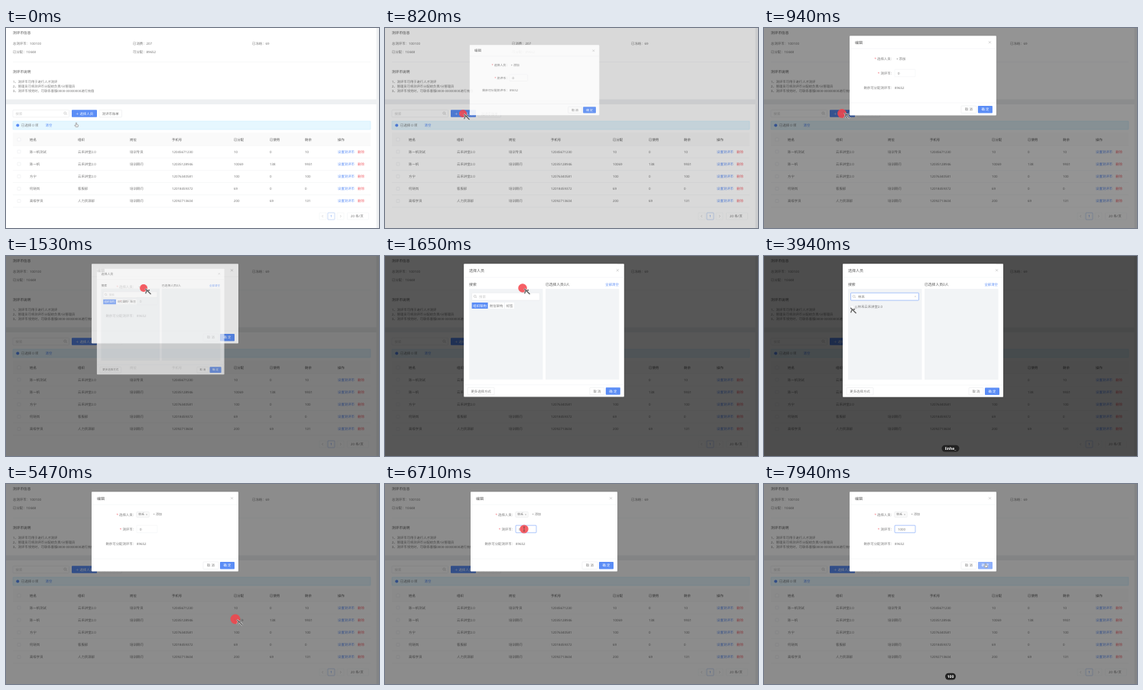
An HTML page for the animation above (8 s loop, 488x262 px).

```html
<!DOCTYPE html>
<html lang="zh-CN">
<head>
<meta charset="utf-8">
<title>测评币分配</title>
<style>
html, body { margin: 0; width: 100%; height: 100%; overflow: hidden; background: #fff; }
svg { display: block; width: 488px; height: 262px; }
text { font-family: "Noto Sans", "Noto Sans CJK SC", "Noto Sans CJK", sans-serif; white-space: pre; text-rendering: geometricPrecision; }
</style>
</head>
<body>
<svg id="stage" viewBox="0 0 488 262"></svg>
<script>
const BLUE = '#5b8df6', RED = '#f2626a', LINE = '#eef0f2', EDGE = '#e4e6e9';
const INK = '#777', DARK = '#555', PALE = '#c8c8c8';
const ORG = '云禾讲堂2.0', PERSON = '林禾', PINYIN = 'linhe_';
const MASK = 0.45;

// ---- Markup helpers: y of a text is its vertical middle ----
const text = (x, y, s, { fill = INK, size = 4.4, weight = 400, anchor = 'start', id = '' } = {}) =>
  `<text ${id && `id="${id}"`} x="${x}" y="${y + size * 0.36}" font-size="${size}" font-weight="${weight}" fill="${fill}" text-anchor="${anchor}">${s}</text>`;
const box = (x, y, w, h, fill = '#fff', stroke = 'none', r = 0, extra = '') =>
  `<rect x="${x}" y="${y}" width="${w}" height="${h}" rx="${r}" fill="${fill}" stroke="${stroke}" stroke-width=".5" ${extra}/>`;
const path = (d, stroke = PALE, width = 0.6, fill = 'none') =>
  `<path d="${d}" fill="${fill}" stroke="${stroke}" stroke-width="${width}"/>`;
const rule = (x, y, w, color = LINE) => path(`M${x} ${y}h${w}`, color, 0.5);
const group = (id, body) => `<g id="${id}">${body}</g>`;
const check = (x, y) => box(x - 2, y - 2, 4, 4, '#fff', EDGE, 0.5);
const lens = (x, y) => path(`M${x + 1} ${y + 1}l1.2 1.2M${x + 1.3} ${y}a1.5 1.5 0 1 0 -3 0a1.5 1.5 0 1 0 3 0`, '#aaa', 0.5);
const cross = (x, y, r = 1.5) => path(`M${x - r} ${y - r}l${2 * r} ${2 * r}m0 ${-2 * r}l${-2 * r} ${2 * r}`, '#aaa', 0.5);
const button = (x, y, w, h, label, primary, id = '') =>
  box(x, y, w, h, primary ? BLUE : '#fff', primary ? 'none' : EDGE, 0.8, id && `id="${id}"`) +
  text(x + w / 2, y + h / 2, label, { fill: primary ? '#fff' : INK, anchor: 'middle' });

function pageMarkup() {
  const columns = [31, 94, 162, 217, 298, 345, 391];
  const heads = ['姓名', '组织', '岗位', '手机号', '已分配', '已使用', '剩余'];
  const rows = [
    ['陈一帆测试', ORG, '培训专员', '12045671230', '10', '0', '10'],
    ['陈一帆', ORG, '培训顾问', '12035128946', '10069', '138', '9931'],
    ['方宁', ORG, '', '12076340581', '100', '0', '100'],
    ['何晓岚', '客服部', '培训顾问', '12018459372', '69', '0', '0'],
    ['高级学员', '人力资源部', '培训顾问', '12092713604', '200', '69', '131'],
  ];
  const table = rows.map((row, i) => {
    const y = 162 + i * 16.15;
    return check(17, y) + row.map((s, c) => text(columns[c], y, s)).join('') +
      text(434, y, '设置测评币', { fill: BLUE }) + text(460, y, '删除', { fill: RED }) + rule(9, y + 8.2, 468);
  }).join('');
  return box(0, 0, 488, 262, '#eef0f2') + box(0, 0, 484.5, 93.5) + box(0, 100, 484.5, 162) +
    text(9, 6.5, '测评币信息', { size: 4.7, weight: 500, fill: DARK }) +
    text(9, 20, '总测评币：100100') + text(166, 20, '已消费：207') + text(322, 20, '已冻结：69') +
    text(9, 31, '已分配：10448') + text(166, 31, '可分配：89652') + rule(9, 44.5, 468) +
    text(9, 57.5, '测评币说明', { size: 4.7, weight: 500, fill: DARK }) +
    ['1、测评币可用于进行人才测评', '2、管理员可将测评币分配给负责/分管理员', '3、测评币领完时，可联系客服0000-00000000进行充值']
      .map((s, i) => text(9, 70 + i * 6.4, s, { size: 4.3 })).join('') +
    box(9, 107.3, 73.5, 9.5, '#fff', EDGE, 0.8) + text(12.5, 112, '搜索', { fill: PALE }) + lens(77.5, 111.5) +
    button(86, 107.3, 33, 9.5, '＋ 选择人员', true) + button(122, 107.3, 29.5, 9.5, '测评币账单') +
    box(9, 122, 468, 11, '#e6f7ff', '#c4e8fd', 0.8) + `<circle cx="15.3" cy="127.5" r="2" fill="${BLUE}"/>` +
    text(20, 127.5, '已选择 0 项') + text(51.5, 127.5, '清空', { fill: BLUE }) +
    box(9, 137, 468, 17.2, '#fafafa') + check(17, 146) + rule(9, 154.2, 468) +
    heads.map((s, c) => text(columns[c], 146, s, { weight: 500, fill: DARK })).join('') +
    text(434, 146, '操作', { weight: 500, fill: DARK }) + table +
    box(410, 242, 9, 9, '#fff', LINE, 0.8) + path('M415 245l-1.5 1.5l1.5 1.5') +
    box(421, 242, 9, 9, '#fff', '#9bb8ee', 0.8) + text(425.5, 246.5, '1', { fill: BLUE, anchor: 'middle' }) +
    box(433, 242, 9, 9, '#fff', LINE, 0.8) + path('M437 245l1.5 1.5l-1.5 1.5') +
    box(446.5, 242, 28, 9, '#fff', LINE, 0.8) + text(451, 246.5, '20 条/页');
}

function editMarkup() {
  const label = (y, s, required) => text(170, y, (required ? `<tspan fill="${RED}">* </tspan>` : '') + s + '：', { anchor: 'end' });
  return box(112, 10.3, 192, 104.2, '#fff', 'none', 0.8) + text(119, 18.7, '编辑', { size: 5, weight: 500, fill: DARK }) +
    cross(295.5, 18.7) + rule(112, 27, 192) +
    label(40, '选择人员', true) + label(59, '测评币', true) + label(78, '剩余可分配测评币') +
    group('addFirst', text(173, 40, '+ 添加')) +
    group('addNext', box(170.8, 36.5, 16.5, 7, '#fafafa', EDGE, 0.6) + text(173, 40, PERSON, { size: 4.1 }) +
      cross(184, 40, 0.8) + text(192.5, 40, '+ 添加', { size: 4.1 })) +
    box(171, 54.2, 27, 9.6, '#fff', LINE, 0.8, 'id="coinBox"') + text(175, 59, '0', { id: 'coins' }) +
    text(171, 78, '89652') + rule(112, 98, 192) +
    button(258, 102, 20, 9.5, '取 消') + button(280, 102, 19, 9.5, '确 定', true, 'editOk');
}

function pickMarkup() {
  const node = (x, y, s) => path(`M${x} ${y - 1}h2l-1 1.8z`, 'none', 0, '#777') +
    path(`M${x + 8} ${y + 1.5}l1.5 -3l1.5 3z`, '#999', 0.5) + text(x + 13, y, s);
  const child = (s, i) => {
    const y = 87 + i * 9.65;
    return path(`M119.2 ${y - 1.1}v2.2l1.6 -1.1z`, 'none', 0, '#777') + check(127.5, y) +
      path(`M133.3 ${y + 1.5}l1.6 -3l1.6 3z`, '#999', 0.5) + text(138.5, y, s);
  };
  const departments = ['东区门店B', '东区门店A', '线上讲师部', '城市中心', '人力资源中心', '总经理', '前厅部', '客房部'];
  return box(103, 10.3, 210, 174.5, '#fff', 'none', 0.8) + text(110, 18.7, '选择人员', { size: 5, weight: 500, fill: DARK }) +
    cross(304.5, 18.7) + rule(103, 28, 210) +
    text(110, 37.6, '搜索', { size: 4.8, fill: DARK }) +
    text(210, 37.6, '已选择人员0人', { size: 4.8, fill: DARK, id: 'pickedCount' }) +
    text(306, 37.6, '全部清空', { fill: BLUE, anchor: 'end' }) +
    box(110, 43, 96.5, 119, '#f2f4f6') + box(210, 43, 96.5, 119, '#f2f4f6') +
    box(113.5, 48.3, 89, 9.8, '#fff', EDGE, 0.8, 'id="searchBox"') + lens(117.8, 52.8) +
    text(123, 53.2, '搜索', { id: 'query' }) +
    group('tabs', box(113.5, 61, 21, 8, BLUE) + text(124, 65, '组织架构', { fill: '#fff', anchor: 'middle' }) +
      box(135, 61, 21, 8) + text(145.5, 65, '岗位架构', { anchor: 'middle' }) +
      box(157, 61, 12, 8) + text(163, 65, '标签', { anchor: 'middle' })) +
    group('tree', node(113.8, 77, ORG) + departments.map(child).join('') + box(202, 72.5, 2.5, 17, '#b9bcc0', 'none', 1)) +
    group('result', check(115.5, 66.7) + path('M119 68.2l1.3 -3l1.3 3z', '#999', 0.5) + text(122.5, 66.7, PERSON + ORG) +
      path('M196.9 52.1l2 2m0 -2l-2 2', PALE, 0.5)) +
    group('picked', box(113.5, 64.7, 4, 4, BLUE, BLUE, 0.5) + path('M114.3 66.7l1 1l1.6 -2', '#fff', 0.5) +
      text(214, 51, PERSON) + cross(301, 51, 1)) +
    rule(103, 169, 210) + button(108, 172.5, 35, 9.5, '更多选择方式') +
    button(268, 172.5, 19, 9.5, '取 消') + button(289, 172.5, 19, 9.5, '确 定', true);
}

const arrowShape = 'M1.2 .8L8.5 8M1.6 7.2L3 3.6L7 2.6';
const cursorMarkup =
  group('arrow', path(arrowShape, '#e8e8e8', 2.2) + path(arrowShape, '#555', 1.1)) +
  group('hand', path('M-.7 1.8v-3.2a.65 .65 0 0 1 1.3 0v1.8l1.6 .4q.7 .3 .5 1l-.6 1.8h-2.9l-1.6 -2.1q.5 -.8 1.7 .3z', '#888', 0.6, '#eee')) +
  group('beam', path('M-1.2 -3q1.2 0 1.2 .8v4.4q0 .8 -1.2 .8M1.2 -3q-1.2 0 -1.2 .8M0 2.2q0 .8 1.2 .8', '#444', 0.6));

const stage = document.getElementById('stage');
stage.innerHTML = group('page', pageMarkup()) + box(0, 0, 488, 262, '#000', 'none', 0, 'id="editMask"') +
  group('edit', editMarkup()) + box(0, 0, 488, 262, '#000', 'none', 0, 'id="pickMask"') + group('pick', pickMarkup()) +
  '<circle id="ripple" fill="#f5434a"/>' + group('cursor', cursorMarkup) +
  group('keys', box(0, 247.7, 0, 8.8, '#222', 'none', 4.4, 'id="keyBox"') +
    text(244, 252, '', { fill: '#fff', weight: 700, anchor: 'middle', size: 5, id: 'keyText' }));

// ---- Timeline ----
const el = {};
for (const node of stage.querySelectorAll('[id]')) el[node.id] = node;
const set = (id, attrs) => { for (const k in attrs) el[id].setAttribute(k, attrs[k]); };
const show = (id, on) => set(id, { visibility: on ? 'inherit' : 'hidden' });
const clamp = v => Math.max(0, Math.min(1, v));
const smooth = p => p * p * (3 - 2 * p);

// Pointer stops: time, x, y
const stops = [
  [0, 92, 126], [80, 92, 126], [480, 102, 112], [900, 102, 112], [1350, 181, 42], [1650, 181, 42],
  [2150, 166, 53], [3380, 166, 53], [3850, 112, 67], [4060, 112, 67], [4220, 115, 67], [4450, 115, 67],
  [5000, 301, 177], [5780, 301, 177], [6420, 182, 59], [7350, 182, 59], [7850, 290, 106], [8000, 290, 106],
];
const clicks = [[660, 102, 112], [1400, 180, 42], [2220, 166, 53], [4280, 115, 67], [5130, 300, 177], [6480, 182, 59]];
const CLICK_TIME = 430;

function pointerAt(t) {
  const i = stops.findIndex((s, k) => k && t <= s[0]);
  const [t0, x0, y0] = stops[i - 1], [t1, x1, y1] = stops[i];
  const p = smooth((t - t0) / (t1 - t0));
  return [x0 + (x1 - x0) * p, y0 + (y1 - y0) * p];
}

// Dialogs zoom out of the point that was clicked, then shrink back into it.
function dialog(id, t, opens, closes, ox, oy) {
  const p = clamp((t - opens) / 300), q = clamp((t - closes) / 200);
  const scale = (1 - 0.8 * (1 - p) ** 7.6) * (1 - 0.8 * q * q);
  show(id, p > 0 && q < 1);
  set(id, { opacity: Math.min(1, p * 4) * (1 - q), transform: `translate(${ox} ${oy}) scale(${scale}) translate(${-ox} ${-oy})` });
  set(id + 'Mask', { opacity: MASK * clamp((t - opens) / 200) * (1 - q) });
}

const typed = (s, t, start, gap) => s.slice(0, t < start ? 0 : Math.floor((t - start) / gap) + 1);

function render(t) {
  dialog('edit', t, 754, Infinity, 102, 112);
  dialog('pick', t, 1482, 5180, 180, 41);

  const name = t > 3320 ? PERSON : typed(PINYIN.slice(0, -1), t, 2820, 110);
  const found = t > 3420, chosen = t > 4320;
  el.query.textContent = name || '搜索';
  set('query', { fill: name ? INK : PALE });
  set('searchBox', { stroke: t > 2250 && t < 4300 ? BLUE : EDGE });
  show('tabs', !found);
  show('tree', t > 1800 && !found);
  show('result', found);
  show('picked', chosen);
  el.pickedCount.textContent = `已选择人员${chosen ? 1 : 0}人`;

  show('addFirst', t < 5180);
  show('addNext', t >= 5180);
  const amount = typed('100', t, 6850, 150);
  el.coins.textContent = amount + '0';
  set('coinBox', { stroke: t > 6500 ? BLUE : LINE });
  set('editOk', { fill: t > 7780 ? '#8fb0fa' : BLUE });

  const keys = t < 4520 ? typed(PINYIN, t, 2680, 110) : amount;
  const width = Math.max(8.8, keys.length * 3 + 5);
  show('keys', keys);
  el.keyText.textContent = keys;
  set('keyBox', { x: 244 - width / 2, width });

  const [x, y] = pointerAt(t);
  const shape = t < 250 || t > 7780 ? 'hand'
    : (t > 2080 && t < 3480) || (t > 6380 && t < 7420) ? 'beam' : 'arrow';
  set('cursor', { transform: `translate(${x} ${y})` });
  for (const kind of ['arrow', 'hand', 'beam']) show(kind, kind === shape);

  const click = clicks.find(c => t >= c[0] && t < c[0] + CLICK_TIME);
  show('ripple', click);
  if (click) {
    const p = (t - click[0]) / CLICK_TIME;
    set('ripple', { cx: click[1], cy: click[2], r: 4 + 3 * p, opacity: 0.85 * Math.min(1, (1 - p) * 5) });
  }
}

function frame() {
  render(performance.now() % 8000);
  requestAnimationFrame(frame);
}
frame();
</script>
</body>
</html>
```
